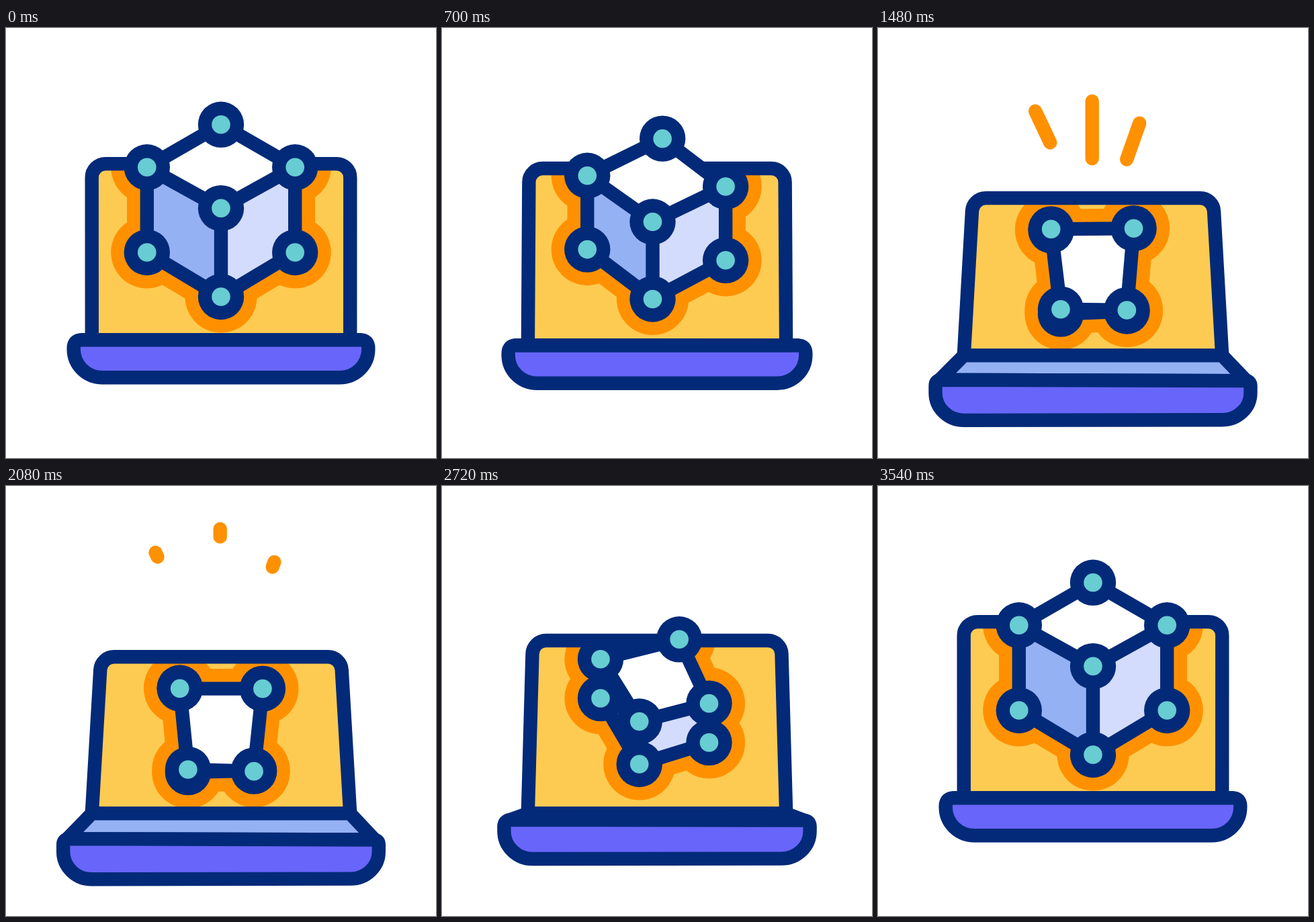
Animation, 640 px wide and 640 px high, one loop 3600 ms. Source, as an HTML page with a canvas:

```html
<!DOCTYPE html>
<html lang="en">
<head>
<meta charset="utf-8">
<title>Laptop and cube</title>
<style>
html, body { margin: 0; width: 100%; height: 100%; overflow: hidden; background: #fff; }
canvas { display: block; width: 640px; height: 640px; }
</style>
</head>
<body>
<canvas id="stage" width="640" height="640"></canvas>
<script>
const ctx = document.getElementById('stage').getContext('2d');
const LOOP = 3600, LINE = 20.4;
const NAVY = '#032a78', ORANGE = '#ff9100', YELLOW = '#fecb52', TEAL = '#67cdd2';
const BLUE = '#94b1f4', PALE = '#d3dcfd', VIOLET = '#6865fa';

// Each point: closed x, y, then open x, y
const NODES = {
  lowLeft: [209.8, 334, 259, 300.3],
  lowRight: [430.2, 334, 368.7, 424],
  bottom: [320, 400, 270.6, 426.3],
  left: [209.8, 207.3, 259, 302],
  right: [430.2, 207.3, 368.7, 426],
  top: [320, 143.8, 382.3, 302.6],
  centre: [320, 268.2, 270.6, 423]
};
const EDGES = ['lowLeft bottom', 'lowRight bottom', 'left lowLeft', 'right lowRight',
  'centre bottom', 'left top', 'top right', 'left centre', 'centre right'].map(e => e.split(' '));
const FACES = [
  [BLUE, ['left', 'centre', 'bottom', 'lowLeft']],
  [PALE, ['right', 'centre', 'bottom', 'lowRight']],
  ['#fff', ['top', 'right', 'centre', 'left']]
];
const RAYS = [[256.5, 171, 222, 98], [318.7, 195, 318.7, 62], [370, 196, 399.7, 112]];

const clamp = v => Math.min(1, Math.max(0, v));
const span = (t, a, b) => clamp((t - a) / (b - a));
const mix = (a, b, k) => a + (b - a) * k;

// Timing curve with handles (x1, 0) and (x2, 1)
function ease(x, x1, x2) {
  let lo = 0, hi = 1;
  for (let i = 0; i < 30; i++) {
    const u = (lo + hi) / 2, v = 1 - u;
    if (3 * u * v * (v * x1 + u * x2) + u * u * u < x) lo = u; else hi = u;
  }
  return lo * lo * (3 - 2 * lo);
}

function openness(t) {
  return t < 1870 ? ease(span(t, 33, 1833), .82, .215)
                  : 1 - ease(span(t, 1915, 3548), .8, .2);
}

function polygon(points) {
  ctx.beginPath();
  points.forEach(p => ctx.lineTo(...p));
  ctx.closePath();
}

function disc(p, r, color) {
  ctx.beginPath();
  ctx.arc(p[0], p[1], r, 0, Math.PI * 2);
  ctx.fillStyle = color;
  ctx.fill();
}

function stroke(color, width = LINE) {
  ctx.strokeStyle = color;
  ctx.lineWidth = width;
  ctx.stroke();
}

function fill(color) {
  ctx.fillStyle = color;
  ctx.fill();
}

function edges(nodes, color, width) {
  ctx.beginPath();
  for (const [a, b] of EDGES) {
    ctx.moveTo(...nodes[a]);
    ctx.lineTo(...nodes[b]);
  }
  stroke(color, width);
}

function screenPath(k) {
  const x = mix(127.7, 141.5, k), y = mix(202.1, 254.6, k);
  ctx.beginPath();
  ctx.moveTo(127.8, 487.4);
  ctx.arcTo(x, y, 320, y, 20.4);
  ctx.arcTo(640 - x, y, 512.2, 487.4, 20.4);
  ctx.lineTo(512.2, 487.4);
  ctx.closePath();
}

function drawScreen(k, nodes) {
  screenPath(k);
  fill(YELLOW);
  ctx.save();
  ctx.clip();
  edges(nodes, ORANGE, 59.5);
  Object.values(nodes).forEach(p => disc(p, 53.6, ORANGE));
  ctx.restore();
  screenPath(k);
  stroke(NAVY);
}

function drawCube(nodes) {
  for (const [color, names] of FACES) {
    polygon(names.map(n => nodes[n]));
    fill(color);
  }
  edges(nodes, NAVY, LINE);
  for (const p of Object.values(nodes)) {
    disc(p, 34.2, NAVY);
    disc(p, 13.8, TEAL);
  }
}

function drawBase(k) {
  const m = (a, b) => mix(a, b, k);
  const frontX = m(113, 91), frontL = m(464.2, 525.5), frontR = m(464.2, 526.9);
  const side = m(100.7, 85.1), bend = m(464.2, 528), shoulder = m(476.5, 534);
  const hip = m(478, 545), pull = m(501.6, 567);
  const footX = m(143.5, 127), footPull = m(119.8, 104);
  const footL = m(520.2, 585.7), footR = m(520.2, 585);
  const flip = x => 640 - x;

  polygon([[127.8, 487.4], [512.2, 487.4], [flip(frontX), frontR], [frontX, frontL]]);
  fill(BLUE);
  stroke(NAVY);

  ctx.beginPath();
  ctx.moveTo(frontX, frontL);
  ctx.lineTo(flip(frontX), frontR);
  ctx.quadraticCurveTo(flip(side), bend, flip(side), shoulder);
  ctx.lineTo(flip(side), hip);
  ctx.bezierCurveTo(flip(side), pull, flip(footPull), footR, flip(footX), footR);
  ctx.lineTo(footX, footL);
  ctx.bezierCurveTo(footPull, footL, side, pull, side, hip);
  ctx.lineTo(side, shoulder);
  ctx.quadraticCurveTo(side, bend, frontX, frontL);
  ctx.closePath();
  fill(VIOLET);
  stroke(NAVY);
}

function drawRays(t) {
  if (t <= 1100 || t >= 2380) return;
  const tip = 1 - (1 - span(t, 1100, 2400)) ** 3;
  const tail = ease(span(t, 1440, 2380), .35, .35);
  if (tip <= tail) return;
  ctx.beginPath();
  for (const [x0, y0, x1, y1] of RAYS) {
    ctx.moveTo(mix(x0, x1, tail), mix(y0, y1, tail));
    ctx.lineTo(mix(x0, x1, tip), mix(y0, y1, tip));
  }
  stroke(ORANGE);
}

function draw(t) {
  const k = openness(t), nodes = {};
  for (const name in NODES) {
    const [x0, y0, x1, y1] = NODES[name];
    nodes[name] = [mix(x0, x1, k), mix(y0, y1, k)];
  }
  ctx.fillStyle = '#fff';
  ctx.fillRect(0, 0, 640, 640);
  drawRays(t);
  drawScreen(k, nodes);
  drawCube(nodes);
  drawBase(k);
}

function tick() {
  draw(performance.now() % LOOP);
  requestAnimationFrame(tick);
}

ctx.lineCap = ctx.lineJoin = 'round';
tick();
</script>
</body>
</html>
```
